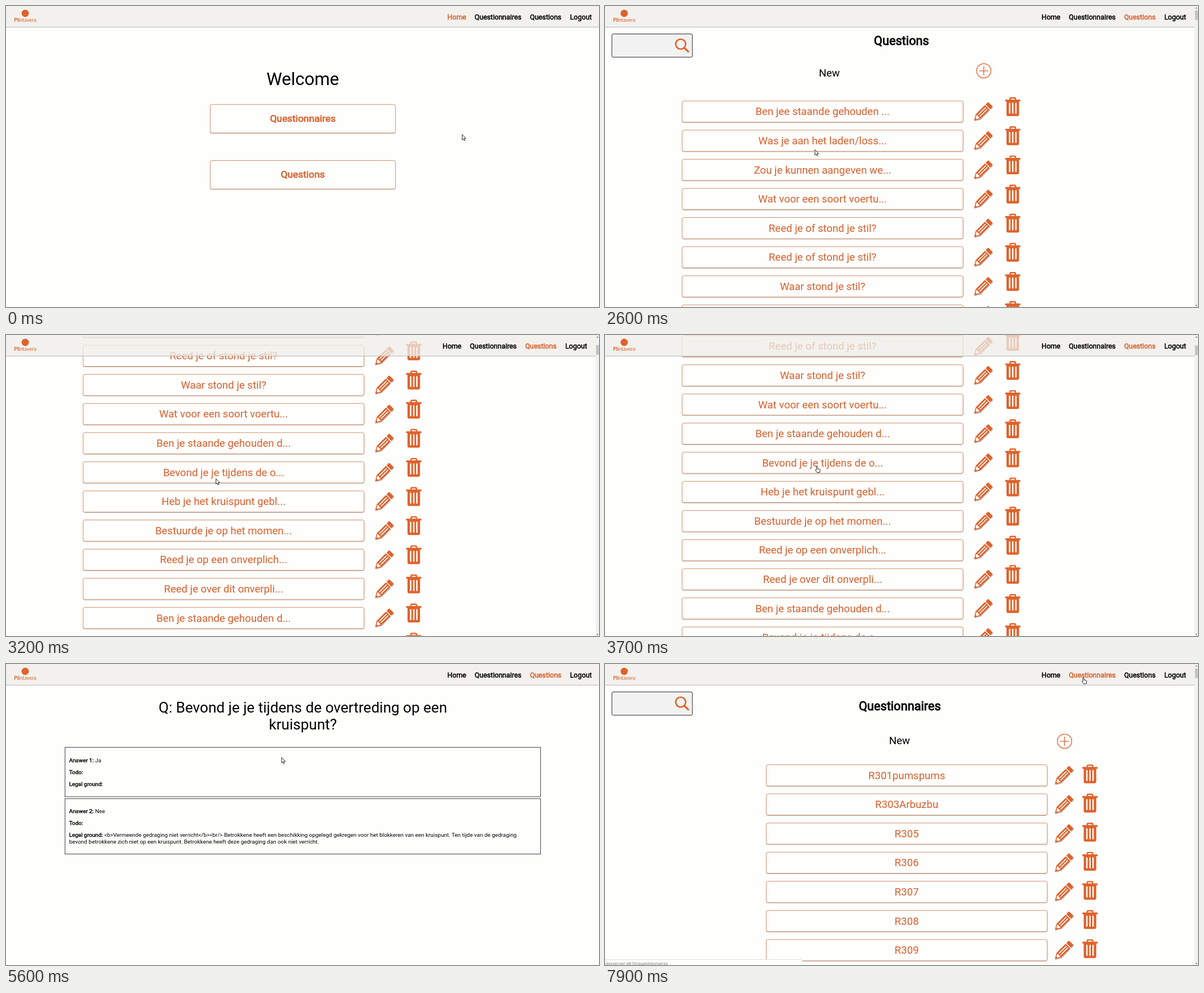
An HTML page for the animation above (8000 ms loop, 1050 px wide and 533 px high).

```html
<!DOCTYPE html>
<html lang="en">
<head>
<meta charset="utf-8">
<title>Questionnaire admin</title>
<style>
html, body { margin: 0; width: 100%; height: 100%; overflow: hidden; background: #fefefd; }
svg { display: block; width: 100vw; height: 100vh; color: #000; font-family: Roboto, sans-serif; }
text { fill: currentColor; white-space: pre; }
.b { stroke: currentColor; stroke-width: .04em; }
.o { color: #d95f2b; }
.status { font-family: "Noto Sans", sans-serif; font-size: 7.6px; color: #777; }
.brand { font-family: Lato, sans-serif; font-size: 9px; color: #dc622c; }
</style>
</head>
<body>
<svg id="stage" viewBox="0 0 1050 533"></svg>
<script>
const LOOP = 8000, U = 12.4, ORANGE = '#e0622b';
const ROW_GAP = 51.58;

const esc = s => s.replace(/</g, '&lt;').replace(/>/g, '&gt;');
const text = (s, x, y, size, cls = '', anchor = 'middle') =>
  `<text x="${x}" y="${y}" font-size="${size * U}" class="${cls}" text-anchor="${anchor}">${esc(s)}</text>`;

const box = (x, y, w, h) => `
  <rect x="${x}" y="${y + .9}" width="${w}" height="${h}" rx="2.8" fill="none" stroke="#5a4a40" stroke-opacity=".4"/>
  <rect x="${x}" y="${y}" width="${w}" height="${h}" rx="2.8" fill="#fefefd" stroke="#d0906c"/>`;

const defs = `<defs>
  <g id="trash">
    <path d="M8.8 5V2.3q0-1 1-1h7.4q1 0 1 1V5" fill="none" stroke="${ORANGE}" stroke-width="2.4"/>
    <path d="M1 4.4H26q1 0 1 1V7.6H24.6V30.5q0 3-3 3H5.4q-3 0-3-3V7.6H0V5.4q0-1 1-1Z" fill="${ORANGE}"/>
    <path d="M8 11V28.2M13.5 11V28.2M19 11V28.2" stroke="#fefefd" stroke-width="2.5" stroke-linecap="round"/>
  </g>
  <path id="body" d="M0 0L10-5.8H33V5.8H10ZM34.6-5.8H39.5q1.6 0 1.6 1.6V4.2q0 1.6-1.6 1.6H34.6Z"/>
  <g id="pencil">
    <use href="#body" transform="translate(1 33.2) rotate(-45)" fill="#000" opacity=".25"/>
    <g transform="translate(0 32) rotate(-45)">
      <use href="#body" fill="${ORANGE}"/>
      <path d="M5.2-1.3L10.4-4V4L5.2 1.3Z" fill="#fefefd"/>
      <path d="M12.5-2H31M12.5 2H31" stroke="#fefefd" stroke-width="1.7"/>
    </g>
  </g>
</defs>`;

const row = (label, x, y, iconX, trashX, trashDy) =>
  box(x, y, 497.5, 37.5) +
  text(label, x + 248.75, y + 25.2, 1.5, 'o') +
  `<use href="#pencil" x="${iconX}" y="${y + 2.8}"/><use href="#trash" x="${trashX}" y="${y + trashDy}"/>`;

const search = `
  <rect x="12.2" y="49.5" width="142.5" height="41.2" rx="2.5" fill="#f2f2f2" stroke="#2c2c2c"/>
  <circle cx="134" cy="67.5" r="8.8" fill="none" stroke="${ORANGE}" stroke-width="2.6"/>
  <path d="M140.5 74L147.3 80.6" stroke="${ORANGE}" stroke-width="3.2" stroke-linecap="round"/>`;

const plus = (x, y) => `<g transform="translate(${x} ${y})" fill="none" stroke="${ORANGE}" stroke-width="1.3">
  <circle r="12.7"/><path d="M-8 0H8M0-8V8"/></g>`;

const home = text('Welcome', 525.5, 140, 2.5) +
  box(361.5, 174.3, 328, 50.5) + text('Questionnaires', 525.5, 205, 1.4, 'o b') +
  box(361.5, 273.5, 328, 50.5) + text('Questions', 525.5, 304.3, 1.4, 'o b');

const questions = ['Ben jee staande gehouden ...', 'Was je aan het laden/loss...', 'Zou je kunnen aangeven we...',
  'Wat voor een soort voertu...', 'Reed je of stond je stil?', 'Reed je of stond je stil?', 'Waar stond je stil?',
  'Wat voor een soort voertu...', 'Ben je staande gehouden d...', 'Bevond je je tijdens de o...',
  'Heb je het kruispunt gebl...', 'Bestuurde je op het momen...', 'Reed je op een onverplich...',
  'Reed je over dit onverpli...', 'Ben je staande gehouden d...', 'Bevond je je tijdens de o...'];
const list = search + text('Questions', 525, 69.4, 1.75, 'b') + text('New', 397.3, 125, 1.5) + plus(670.7, 114.8) +
  questions.map((q, i) => row(q, 136.5, 168.2 + i * ROW_GAP, 653.5, 708.5, -6.8)).join('');

const forms = ['R301pumspums', 'R303Arbuzbu', 'R305', 'R306', 'R307', 'R308', 'R309'];
const formList = search + text('Questionnaires', 522, 81.6, 1.75, 'b') + text('New', 521.5, 141.5, 1.5) + plus(813.7, 136.8) +
  forms.map((f, i) => row(f, 285.5, 178.4 + i * ROW_GAP, 796.5, 845.2, -.6)).join('');

const field = (label, value, y) => `<text x="111.7" y="${y}" font-size="${.8 * U}"><tspan class="b">${label}:</tspan> ${esc(value)}</text>`;
const frame = (y, h) => `<rect x="104.5" y="${y}" width="842" height="${h}" fill="none" stroke="#444"/>`;
const answers = text('Q: Bevond je je tijdens de overtreding op een', 525.7, 85.7, 2.1) +
  text('kruispunt?', 525.7, 116.3, 2.1) +
  frame(147.5, 87.5) + field('Answer 1', 'Ja', 173.6) + field('Todo', '', 194.6) + field('Legal ground', '', 215.9) +
  frame(238.5, 98) + field('Answer 2', 'Nee', 264) + field('Todo', '', 285) +
  field('Legal ground', '<b>Vermeende gedraging niet verricht</b><br/> Betrokkene heeft een beschikking opgelegd gekregen voor het blokkeren van een kruispunt. Ten tijde van de gedraging', 306.4) +
  text('bevond betrokkene zich niet op een kruispunt. Betrokkene heeft deze gedraging dan ook niet verricht.', 111.7, 317.8, .8, '', 'start');

const navItems = [['Home', 781.6], ['Questionnaires', 829.8], ['Questions', 927.7], ['Logout', 998.7]];
const header = `<rect width="1050" height="37" fill="#eeece8" fill-opacity=".75"/>
  <path d="M0 37.4H1050" stroke="#bab5b1"/>
  <circle cx="34" cy="13" r="6.5" fill="${ORANGE}"/>
  <text class="brand" x="34" y="28.3" text-anchor="middle"><tspan font-weight="700">Pli</tspan>ntavera</text>
  <g id="nav">${navItems.map(([s, x]) => text(s, x, 23.7, 1, 'b', 'start')).join('')}</g>`;

const scrollbar = `<g id="bar"><rect x="1044" width="6" height="533" fill="#f1f1f1"/>
  <path d="M1045.5 4.5l1.7-2 1.7 2ZM1045.5 529.5l1.7 2 1.7-2Z" fill="#555"/>
  <rect id="thumb" x="1044.8" width="4.8" height="17" fill="#c1c1c1"/></g>`;

const pages = { home, list, answers, formList };
const $ = id => document.getElementById(id);
$('stage').innerHTML = defs + '<rect width="1050" height="533" fill="#fefefd"/>' +
  Object.entries(pages).map(([id, s]) => `<g id="${id}">${s}</g>`).join('') + header + scrollbar +
  `<g id="status"><path d="M0 523.5H347q2.5 0 2.5 2.5V534H0Z" fill="#fefefd" stroke="#dededc"/>
    <text id="url" class="status" x="1" y="532.6"></text></g>
  <g id="cursor" fill="#fff" stroke="#111" stroke-width=".9" stroke-linejoin="round">
    <path id="arrow" d="M0 .5V10L2.1 8.1 3.5 11.4 5.1 10.7 3.7 7.5H6.5Z"/>
    <path id="hand" d="M3.2.5q1 0 1 1V4.3L7.6 5q1.4.3 1.3 1.7L8.2 11H3.6L.7 7.4q-.4-1 .6-1.2L2.2 6.8V1.5q0-1 1-1Z"/>
  </g>`;

const clamp = v => Math.min(1, Math.max(0, v));
const smooth = p => p * p * (3 - 2 * p);
const span = (t, a, b) => clamp((t - a) / (b - a));
const within = (t, a, b) => t >= a && t < b;

// Pointer moves: start, end, target x, target y
const moves = [[600, 1500, 537, 322], [2200, 2600, 371.8, 254], [3400, 3800, 372, 228.5], [5500, 5600, 488, 165],
  [5700, 6300, 872, 36], [6300, 6500, 796, 15], [6700, 6800, 796.5, 16], [6900, 7100, 868, 20], [7800, 7900, 844, 24]];

function pointer(t) {
  let x = 807.8, y = 227;
  for (const [a, b, tx, ty] of moves) {
    const p = smooth(span(t, a, b));
    x += (tx - x) * p;
    y += (ty - y) * p;
  }
  return [x, y];
}

const host = 'devserver:4810';
function status(t) {
  if (within(t, 1700, 2600)) return ['/questions', 1 - span(t, 2200, 2500)];
  if (within(t, 3800, 4700)) return ['/questions/b31ad7c2-a9cd-42f7-9be3-53127c95111d', t < 4000 ? .5 : 1 - span(t, 4400, 4700)];
  if (within(t, 6600, 7100)) return ['', t < 6800 ? .5 : 1];
  return t >= 7100 ? ['/questionnaires', 1] : ['', 0];
}

function draw(time) {
  const t = Math.floor(time / 100) * 100;
  const page = t < 2000 ? 'home' : t < 4300 ? 'list' : t < 7500 ? 'answers' : 'formList';
  for (const id in pages) $(id).style.display = id === page ? '' : 'none';

  const scroll = page === 'list'
    ? 408 * (1 - (1 - span(t, 2800, 3200)) ** 1.44) + 20 * smooth(span(t, 3400, 3800)) : 0;
  $('list').setAttribute('transform', `translate(0 ${-scroll})`);
  const long = page === 'list' || page === 'formList';
  $('bar').style.display = long ? '' : 'none';
  $('thumb').setAttribute('y', 8 + scroll * .0245);

  const active = { home: 0, list: 2, answers: 2, formList: 1 }[page];
  $('nav').setAttribute('transform', `translate(${long ? -8.5 : 0} 0)`);
  [...$('nav').children].forEach((n, i) => n.classList.toggle('o', i === active));

  const [path, alpha] = status(t);
  $('url').textContent = host + path;
  $('status').setAttribute('opacity', alpha);

  const [x, y] = pointer(t);
  const hand = within(t, 1200, 2300) || within(t, 3700, 4300) || t >= 6400;
  $('cursor').setAttribute('transform', `translate(${x} ${y})`);
  $('hand').style.display = hand ? '' : 'none';
  $('arrow').style.display = hand ? 'none' : '';
}

const start = performance.now();
function tick() {
  draw((performance.now() - start) % LOOP);
  requestAnimationFrame(tick);
}
tick();
</script>
</body>
</html>
```
